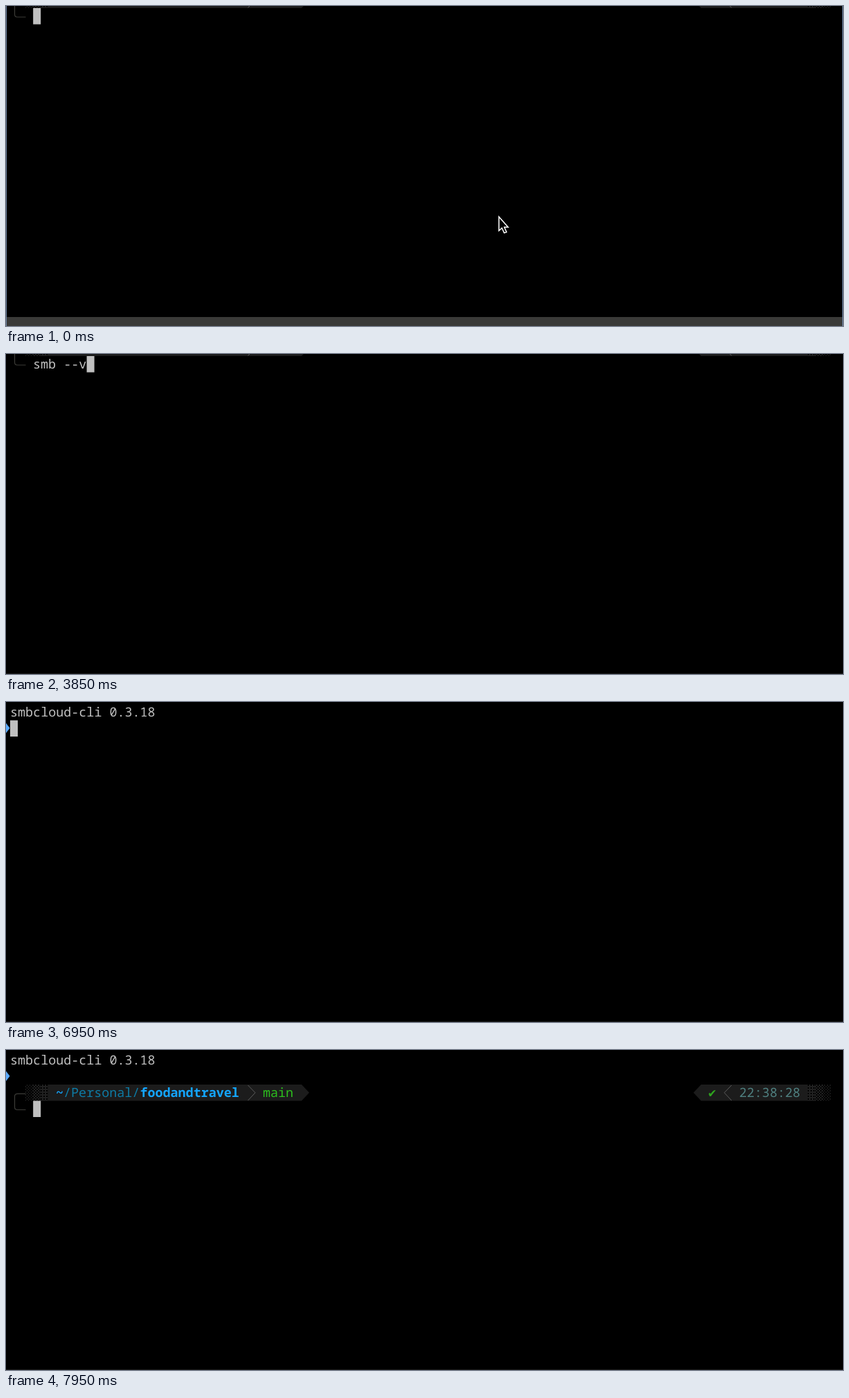
An HTML page that plays this animation: 1209 by 463 pixels, repeating every 8 s.

```html
<!DOCTYPE html>
<html lang="en">
<head>
<meta charset="utf-8">
<title>Terminal</title>
<style>
  html, body { margin: 0; width: 100%; height: 100%; overflow: hidden; background: #000; }
  svg { display: block; }
  text {
    font: 18.4px "Noto Sans Mono", "DejaVu Sans Mono", monospace;
    fill: #c0c0c0;
    white-space: pre;
    text-rendering: geometricPrecision;
  }
  .path { fill: #0e7ba5; }
  .bold { fill: #14a5ff; font-weight: 700; }
  .branch { fill: #2cbe1e; }
  .check { fill: #2ea61e; font-family: "DejaVu Sans Mono", monospace; }
  .clock { fill: #4f8080; }
  .line { fill: none; stroke: #5c5c5c; }
  .frame { fill: none; stroke: #3c3c38; stroke-width: 1.2; }
</style>
</head>
<body>
<svg width="1209" height="463" viewBox="0 0 1209 463">
  <defs>
    <pattern id="light" width="4" height="4" patternUnits="userSpaceOnUse">
      <path d="M0 0h1v2h-1zM2 2h1v2h-1z" fill="#222"/>
    </pattern>
    <pattern id="medium" width="4" height="4" patternUnits="userSpaceOnUse">
      <path d="M0 0h2v2h-2zM2 2h2v2h-2z" fill="#222"/>
    </pattern>
    <pattern id="dense" width="4" height="4" patternUnits="userSpaceOnUse">
      <path d="M0 0h4v2h-2v2h-2z" fill="#202020"/>
    </pattern>
  </defs>
  <rect width="1209" height="463"/>
  <path d="M0 462.5H1209" stroke="#1c1c1c"/>

  <g id="prompt">
    <path d="M60.5 50H427L438 61.8L427 73.5H60.5zM1158 50H1004L993 61.8L1004 73.5H1158z" fill="#1c1c1c"/>
    <path d="M27 50h11.2v23.5H27zM1180 50h11.2v23.5H1180z" fill="url(#light)"/>
    <path d="M38.2 50h11.2v23.5H38.2zM1169 50h11v23.5H1169z" fill="url(#medium)"/>
    <path d="M49.4 50h11.1v23.5H49.4zM1158 50h11v23.5H1158z" fill="url(#dense)"/>
    <path class="line" d="M349.5 51L360 61.8L349.5 73M1048 51L1037.5 61.8L1048 73"/>
    <path class="frame" d="M28.5 63.3H16.5Q12.5 63.3 12.5 67.3V82.5Q12.5 86.5 16.5 86.5H28.5"/>
    <text x="72" y="68"><tspan class="bold">~</tspan><tspan class="path">/Personal/</tspan><tspan class="bold">foodandtravel</tspan></text>
    <text x="371" y="68" class="branch">main</text>
    <text x="1014.5" y="68" class="check">✔</text>
    <text x="1059" y="68" class="clock">22:38:28</text>
  </g>

  <path id="marker" d="M0 30.5L5.5 37.8L0 45z" fill="#5aa9ff"/>
  <text id="typed" x="39" y="21"></text>
  <text id="output" x="6" y="21">smbcloud-cli 0.3.18</text>
  <rect id="caret" width="11" height="23.5" fill="#c0c0c0"/>

  <g id="pointer">
    <path d="M712 305V325L716.3 321.2L719.6 328.4L723 327L719.8 320H725.3z" fill="#000" stroke="#fff" stroke-width="1.5"/>
  </g>
  <path id="edges" d="M.5 0V463M1208.5 0V463" stroke="#6f86a8"/>
  <rect id="bar" x="1" y="450" width="1207" height="13" fill="#3a3a38"/>
</svg>
<script>
  const LOOP = 8000, CELL = 11.06, ROW = 23.5, TOP = 3;
  const COMMAND = 'smb --version';
  const KEYS = [490, 810, 910, 1350, 2890, 3290, 3570, 4130, 4550, 4730, 5290, 5670, 5870];
  const ENTER = 6230, PRINTED = 6650, READY = 6970;
  const $ = id => document.getElementById(id);
  const show = (id, on) => $(id).style.display = on ? '' : 'none';

  function placeCaret(col, row) {
    $('caret').setAttribute('x', 6 + col * CELL);
    $('caret').setAttribute('y', TOP + row * ROW);
  }

  function draw(t) {
    const typing = t < ENTER, printed = t >= PRINTED, ready = t >= READY;
    const count = KEYS.filter(k => k <= t).length;

    $('typed').textContent = typing ? COMMAND.slice(0, count) : '';
    $('prompt').setAttribute('transform', `translate(0 ${typing ? -3 * ROW : 0})`);
    show('prompt', typing || ready);
    show('output', printed);
    show('marker', printed);
    show('pointer', t < KEYS[0]);
    show('edges', t < KEYS[0]);
    $('bar').style.opacity = [20, 80, 140].filter(s => t < s).length / 3;

    if (typing) placeCaret(3 + count, 0);
    else if (ready) placeCaret(3, 3);
    else placeCaret(0, printed ? 1 : 0);
  }

  function tick() {
    draw(performance.now() % LOOP);
    requestAnimationFrame(tick);
  }
  tick();
</script>
</body>
</html>
```
